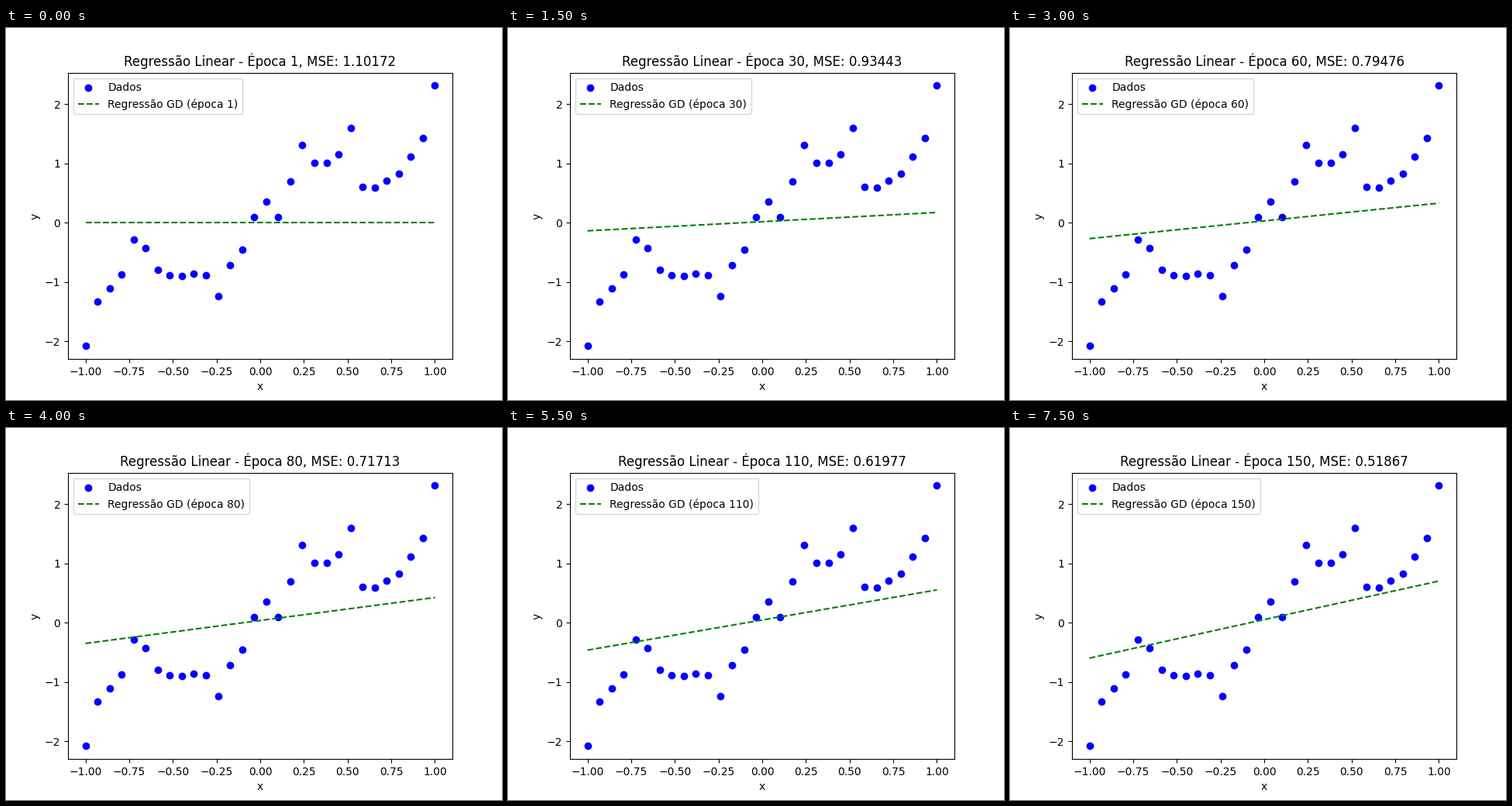
These frames come from a looping animation (640 by 480 pixels, 8000 ms). A matplotlib script:

```python
import matplotlib.pyplot as plt
import numpy as np
from matplotlib.animation import FuncAnimation

FRAMES = 16
INTERVAL = 500
RATE = 0.01

# Least-squares optimum and its residual error
SLOPE, BIAS, FLOOR = 1.574852, 0.067654, 0.213408

x = np.linspace(-1, 1, 30)
y = np.array([
    -2.080, -1.330, -1.108, -0.873, -0.285, -0.430, -0.795, -0.886, -0.900, -0.860,
    -0.886, -1.238, -0.716, -0.455, 0.094, 0.356, 0.094, 0.695, 1.303, 1.008,
    1.008, 1.152, 1.596, 0.603, 0.590, 0.708, 0.826, 1.113, 1.426, 2.310,
])
VAR_X = np.mean(x ** 2)


def descend(epoch):
    """Slope, bias and MSE at the start of an epoch, descending from zero."""
    steps = epoch - 1
    left_w = SLOPE * (1 - RATE * VAR_X) ** steps
    left_b = BIAS * (1 - RATE) ** steps
    mse = FLOOR + VAR_X * left_w ** 2 + left_b ** 2
    return SLOPE - left_w, BIAS - left_b, mse


fig, ax = plt.subplots(figsize=(6.4, 4.8), dpi=100)
ax.scatter(x, y, color="blue", label="Dados")
line, = ax.plot(x, 0 * x, "g--", label="Regressão GD (época 1)")
ax.set_xlabel("x")
ax.set_ylabel("y")
title = ax.set_title("")
caption = ax.legend(loc="upper left").get_texts()[1]


def update(i):
    epoch = max(1, 10 * i)
    w, b, mse = descend(epoch)
    line.set_ydata(w * x + b)
    title.set_text(f"Regressão Linear - Época {epoch}, MSE: {mse:.5f}")
    caption.set_text(f"Regressão GD (época {epoch})")
    return line, title, caption


anim = FuncAnimation(fig, update, frames=FRAMES, interval=INTERVAL, repeat=True)
plt.show()
```
